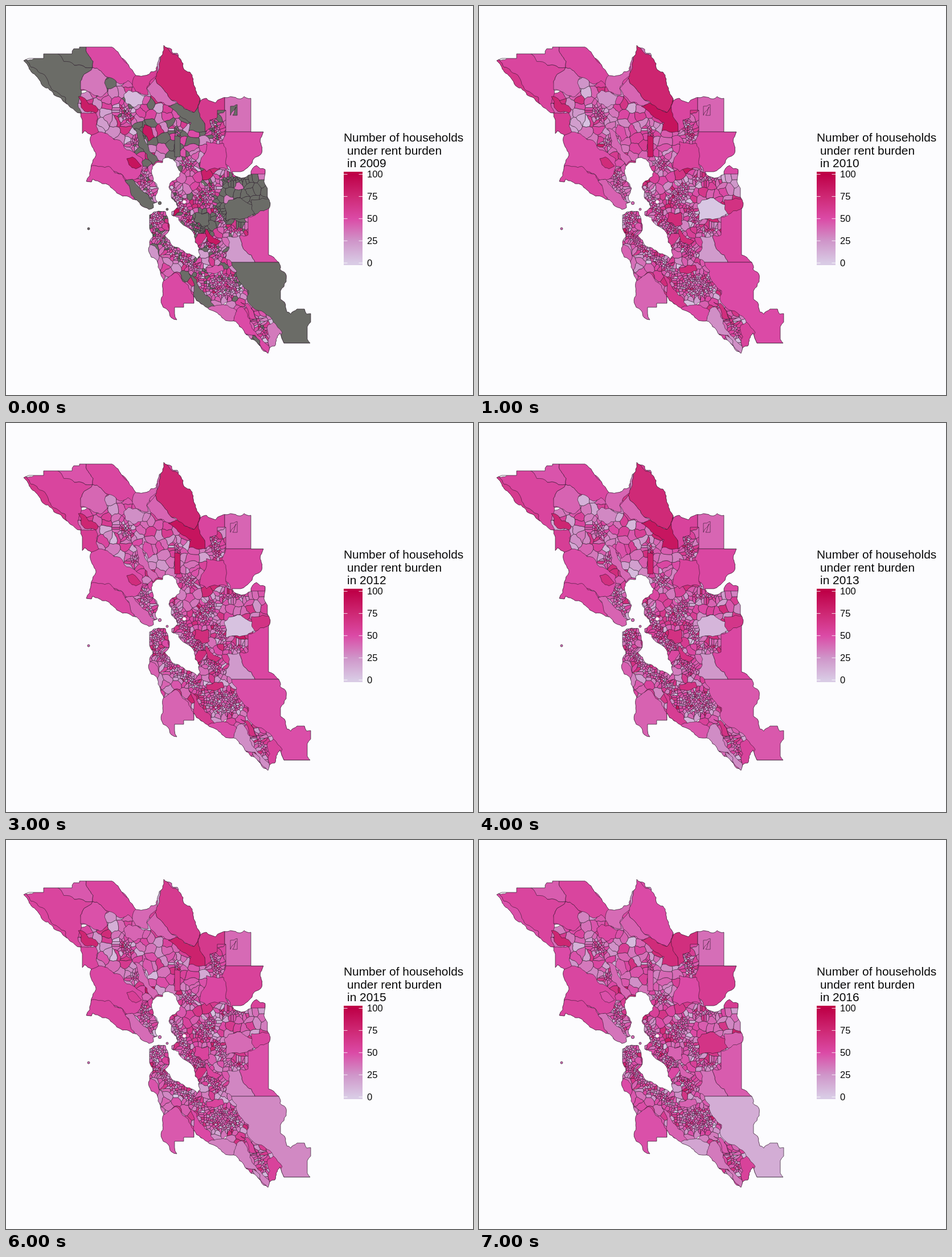
Recreate the animation shown at these times as an HTML page with a canvas. Size 820 by 683 pixels, loop 8000 ms.

```html
<!DOCTYPE html>
<html lang="en">
<head>
<meta charset="utf-8">
<title>Rent burden by year</title>
<style>
  html, body { margin: 0; width: 100%; height: 100%; overflow: hidden; background: #fcfcfe; }
  canvas, svg { position: absolute; left: 0; top: 0; width: 820px; height: 683px; }
  text { font-family: "Liberation Sans", Arial, sans-serif; font-size: 20.9px; white-space: pre; fill: #080808; }
  #scale text { font-size: 16.6px; }
</style>
</head>
<body>
<canvas id="map" width="820" height="683"></canvas>
<svg viewBox="0 0 820 683">
  <defs><linearGradient id="ramp" x1="0" y1="0" x2="0" y2="1"></linearGradient></defs>
  <text x="593" y="238">Number of households</text>
  <text x="599" y="260.5">under rent burden</text>
  <text x="599" y="283" id="year">in 2009</text>
  <rect x="593" y="291" width="33" height="164" fill="url(#ramp)"/>
  <g id="scale"></g>
</svg>
<script>
const start = performance.now();
const ctx = document.getElementById('map').getContext('2d');
const yearLabel = document.getElementById('year');
const PAPER = '#fcfcfe', MISSING = 'rgb(107,108,103)', INK = 'rgba(34,18,34,.92)';
const YEARS = 8, FIRST_YEAR = 2009;
const RAMP = [[217,203,229], [207,149,201], [219,74,166], [206,40,116], [190,0,71]];

const mix = (a, b, k) => a + (b - a) * k;
const clamp = (v, lo, hi) => Math.min(hi, Math.max(lo, v));
const points = s => s.trim().split(/\s+/).map(p => p.split(',').map(Number));

let seed = 71;
function random() {
  seed = (seed * 1664525 + 1013904223) >>> 0;
  return seed / 4294967296;
}
const spread = () => random() + random() + random() + random() - 2;
const noise = (x, y) => {
  const v = Math.sin(Math.round(x) * 12.9898 + Math.round(y) * 78.233) * 43758.5453;
  return v - Math.floor(v);
};

function colour(v) {
  if (v === null) return MISSING;
  const pos = clamp(v, 0, 99.9) / 25, i = Math.floor(pos);
  return `rgb(${RAMP[i].map((c, n) => Math.round(mix(c, RAMP[i + 1][n], pos - i)))})`;
}

function buildLegend() {
  let stops = '', marks = '';
  for (let v = 100; v >= 0; v -= 25) {
    const y = 451.2 - v * 1.557;
    stops += `<stop offset="${(y - 291) / 164}" stop-color="${colour(v)}"/>`;
    marks += `<path d="M593 ${y}h6.5m20 0h6.5" stroke="#fff" opacity=".85"/>
      <text x="634" y="${y + 5.9}">${v}</text>`;
  }
  document.getElementById('ramp').innerHTML = stops;
  document.getElementById('scale').innerHTML = marks;
}

// Natural borders get fractal detail; surveyed (axis-aligned) ones stay straight.
function roughen(a, b, out) {
  const dx = b[0] - a[0], dy = b[1] - a[1];
  if (Math.hypot(dx, dy) < 6 || !dx || !dy) { out.push(b); return; }
  const mx = (a[0] + b[0]) / 2, my = (a[1] + b[1]) / 2;
  const k = (noise(mx, my) - .5) * .3 * Math.sign(dx);
  const mid = [mx - dy * k, my + dx * k];
  roughen(a, mid, out);
  roughen(mid, b, out);
}

function shape(corners) {
  const line = [];
  corners.forEach((p, i) => roughen(p, corners[(i + 1) % corners.length], line));
  const path = new Path2D();
  line.forEach(p => path.lineTo(p[0], p[1]));
  path.closePath();
  return path;
}

const northEdge = points(`31,96 40,92 66,92 66,84 116,84 119,75 129,75 129,72 186,72 199,85 215,103 228,122
  264,113 267,98 275,85 277,69 291,76 293,83 301,83 311,108 323,116 331,141 341,167 352,162 368,170 377,163
  400,160 412,163 418,159 430,162 430,221 452,221 447,232 449,258 437,266 432,276 421,286 412,291 397,291`);
const eastEdge = points(`400,297 410,301 422,300 430,296 433,285 440,280 455,287 459,320 459,335 464,346
  461,360 461,437 470,441 479,450 481,462 491,470 492,484 482,500 482,515 489,520 493,537 500,541 511,532
  524,532 528,541 535,540 535,555 529,563 529,585 534,592 488,592 481,574`);
const southEdge = points(`472,597 463,600 460,610 447,598 440,590 430,585 410,563 400,553 382,549 357,533
  330,509 330,522 312,522 312,529 296,529 296,540 300,551 290,547 285,535 276,529 273,512 277,482 266,450
  255,441 251,432 258,405 252,390 252,367`);
const westEdge = points(`251,357 236,349 226,340 198,330 175,312 152,304 150,309 141,308 147,298 158,262
  148,231 150,227 138,219 134,224 134,200 131,188 113,178 104,170 97,162 84,156 74,144 62,137 52,122 37,102`);
const land = shape([...northEdge, ...eastEdge, ...southEdge, ...westEdge]);

const water = shape(points(`240,362 252,357 259,354 258,347 266,344 262,335 268,320 258,307 256,295 257,282
  263,276 275,275 276,268 285,266 299,275 302,285 307,291 305,299 297,306 288,311 286,318 291,325 290,335
  299,345 302,353 291,361 291,367 303,371 316,387 325,393 331,402 332,415 341,438 336,445 313,431 302,424
  292,421 287,411 279,402 284,398 285,380 280,361 268,360 252,367 240,366`));

function blob(x, y, r) {
  const path = new Path2D();
  path.arc(x, y, r, 0, 2 * Math.PI);
  return path;
}
const islands = [blob(270, 346, 2.8), blob(283, 357, 2), blob(145, 391, 2)];
const lake = blob(313, 344, 3);

// Town corridors are packed with sites on a street grid; the land between gets a loose scatter.
const SPACING = 4.3, STREET = 1.5;
const sites = [];
const gapTo = ([x, y]) => sites.reduce((g, s) => Math.min(g, Math.hypot(s[0] - x, s[1] - y)), 999);

function town(x1, y1, x2, y2, r) {
  const size = Math.hypot(x2 - x1, y2 - y1) * 2 * r + Math.PI * r * r;
  const snap = v => Math.round(v / STREET) * STREET;
  const pick = () => {
    const k = random(), a = random() * 2 * Math.PI, d = r * Math.sqrt(random());
    return [snap(mix(x1, x2, k) + d * Math.cos(a)), snap(mix(y1, y2, k) + d * Math.sin(a))];
  };
  for (let n = size / SPACING ** 2; n > 0; n--) {
    const p = [pick(), pick(), pick()].sort((a, b) => gapTo(b) - gapTo(a))[0];
    if (gapTo(p) > 1) sites.push(p);
  }
}

function countryside(step) {
  for (let x = 130; x < 480; x += step) {
    for (let y = 110; y < 610; y += step) {
      const p = [x + random() * step, y + random() * step];
      if (gapTo(p) > step * .4) sites.push(p);
    }
  }
}

town(205, 180, 214, 195, 12);
town(222, 236, 230, 242, 9);
town(240, 292, 252, 335, 10);
town(298, 214, 302, 224, 8);
town(312, 270, 325, 284, 11);
town(364, 206, 372, 234, 11);
town(296, 322, 318, 372, 10);
town(318, 372, 380, 440, 12);
town(340, 345, 362, 318, 15);
town(375, 302, 420, 306, 7);
town(368, 350, 382, 385, 9);
town(388, 394, 418, 394, 7);
town(267, 368, 267, 382, 14);
town(262, 395, 292, 432, 9);
town(292, 430, 345, 468, 10);
town(362, 488, 400, 492, 23);
town(440, 546, 456, 582, 7);
countryside(15);

function cellAround([x, y]) {
  let poly = [[x - 40, y - 40], [x + 40, y - 40], [x + 40, y + 40], [x - 40, y + 40]];
  const near = sites.map(([u, v]) => [u - x, v - y, Math.hypot(u - x, v - y)])
    .filter(s => s[2] > 0 && s[2] < 60).sort((a, b) => a[2] - b[2]).slice(0, 50);
  for (const [dx, dy, d] of near) {
    const side = p => (p[0] - x) * dx + (p[1] - y) * dy - d * d / 2;
    const next = [];
    poly.forEach((p, i) => {
      const q = poly[(i + 1) % poly.length], a = side(p), b = side(q);
      if (a <= 0) next.push(p);
      if (a * b < 0) next.push([mix(p[0], q[0], a / (a - b)), mix(p[1], q[1], a / (a - b))]);
    });
    poly = next;
  }
  return poly;
}

// Two inland districts have hardly any figures in the first year.
function missingChance(x, y) {
  const within = (cx, cy, rx, ry) => Math.hypot((x - cx) / rx, (y - cy) / ry) < 1;
  if (within(418, 340, 50, 50)) return .9;
  if (within(285, 225, 45, 55) || within(350, 385, 25, 30)) return .55;
  return .13;
}

const tracts = sites.map(site => {
  const level = 42 + spread() * 20;
  const values = Array.from({ length: YEARS }, () => clamp(level + spread() * 16, 4, 96));
  if (random() < missingChance(...site)) values[0] = null;
  return { path: shape(cellAround(site)), value: year => values[year] };
});

// A large tract opens with its first figure (null: none), then drifts, ever faster, between two others.
function tract(first, from, to, corners) {
  const value = year => year ? mix(from, to, ((year - 1) / (YEARS - 2)) ** 3) : first;
  tracts.push({ path: shape(points(corners)), value });
}

// North-west
tract(null, 54, 54, '20,96 66,80 88,80 120,104 152,108 137,120 131,132 132,147 128,165 133,190 90,175');
tract(null, 64, 48, '20,92 36,95 56,115 78,141 92,153 104,160 107,172 60,150');
tract(null, 47, 44, '88,83 88,70 140,70 153,97 152,108 120,104');
tract(51, 53, 54, '140,70 186,70 235,122 224,140 214,131 200,137 178,125 152,108 153,97');
tract(35, 40, 53, '152,108 178,125 173,135 178,150 165,160 131,147 131,132 137,120');
tract(82, 76, 76, '127,159 138,162 145,172 157,175 162,183 158,188 138,185 132,178');
tract(62, 60, 50, '130,187 158,188 161,195 163,221 150,227 130,228');
tract(8, 26, 52, '207,155 215,148 230,150 244,158 240,172 225,178 212,172');
tract(50, 49, 53, '145,227 163,221 200,236 230,262 240,268 237,293 228,304 212,306 205,297 145,281');
tract(50, 52, 54, '130,310 152,280 205,297 222,322 228,348 170,320');
tract(88, 72, 48, '212,268 222,265 238,281 228,286 216,279');
tract(null, 42, 36, '209,307 222,304 235,320 262,346 260,362 240,356 218,322');
// North-east
tract(58, 41, 39, '228,110 266,106 268,122 247,145 250,156 228,150 222,140');
tract(77, 77, 50, '270,60 345,100 345,167 330,187 290,165 268,138 262,127 268,112');
tract(38, 41, 42, '262,127 268,138 290,165 300,172 285,175 253,156 247,145');
tract(null, 88, 72, '285,176 300,170 330,187 341,165 340,180 350,221 321,219 325,205 300,187');
tract(null, 40, 40, '225,215 240,222 255,258 268,272 258,279 232,245');
tract(85, 48, 43, '243,208 254,212 261,230 250,238 240,222');
tract(null, 85, 44, '296,228 306,230 306,265 296,265');
tract(62, 53, 70, '341,167 341,155 384,155 384,183 371,183 371,196 358,200 360,214 350,221 338,185');
tract(37, 41, 38, '384,183 384,150 435,150 435,221 386,221 386,183');
tract(null, 41, 38, '394,192 394,176 406,173 406,192 398,192 404,177');
tract(49, 51, 60, '386,221 460,221 455,295 397,295 386,278 382,232');
tract(51, 55, 50, '352,238 382,241 386,278 392,288 352,291 340,283 347,262');
// East
tract(null, 2, 66, '383,350 391,341 412,337 438,350 437,365 410,375 386,377');
tract(null, 68, 42, '431,340 470,337 470,356 438,366');
tract(49, 53, 44, '425,370 470,355 470,437 485,450 437,450 410,403 425,402');
tract(22, 22, 36, '388,405 410,403 437,450 396,450 385,443 392,425');
tract(null, 72, 42, '332,363 355,362 357,383 345,388 330,378');
tract(85, 72, 42, '350,391 377,413 369,420 357,415');
// South
tract(null, 50, 14, '396,450 500,450 545,520 545,592 488,592 481,574 463,545 425,520 426,500 405,465');
tract(51, 41, 48, '277,482 298,468 320,490 330,509 330,535 305,560 265,540');
tract(45, 72, 42, '352,459 380,455 383,465 368,470 352,467');
tract(25, 42, 50, '245,420 262,422 268,436 266,452 245,445');
tract(null, 62, 42, '322,470 335,480 345,500 366,527 357,536 329,510');
tract(40, 50, 18, '350,535 366,527 395,530 405,535 400,560');
tract(50, 27, 34, '405,533 415,528 440,575 463,598 462,616 398,556');
tract(53, 70, 45, '412,520 424,522 440,550 428,548');
tract(34, 55, 56, '460,560 470,555 485,573 478,600 463,602');

function draw(year) {
  ctx.fillStyle = PAPER;
  ctx.fillRect(0, 0, 820, 683);
  ctx.strokeStyle = INK;
  ctx.lineJoin = 'round';
  ctx.save();
  ctx.clip(land);
  ctx.lineWidth = .6;
  for (const { path, value } of tracts) {
    ctx.fillStyle = colour(value(year));
    ctx.fill(path);
    ctx.stroke(path);
  }
  ctx.fillStyle = PAPER;
  ctx.fill(lake);
  ctx.restore();
  ctx.lineWidth = .7;
  ctx.stroke(land);
  ctx.fill(water);
  ctx.fillRect(240, 358, 13, 8);
  ctx.save();
  ctx.clip(land);
  ctx.stroke(water);
  ctx.restore();
  ctx.fillStyle = colour(year ? 38 : null);
  for (const island of islands) { ctx.fill(island); ctx.stroke(island); }
  yearLabel.textContent = `in ${FIRST_YEAR + year}`;
}

let shown = -1;
function tick() {
  const year = Math.floor((performance.now() - start) / 1000) % YEARS;
  if (year !== shown) draw(shown = year);
  requestAnimationFrame(tick);
}
buildLegend();
tick();
</script>
</body>
</html>
```
